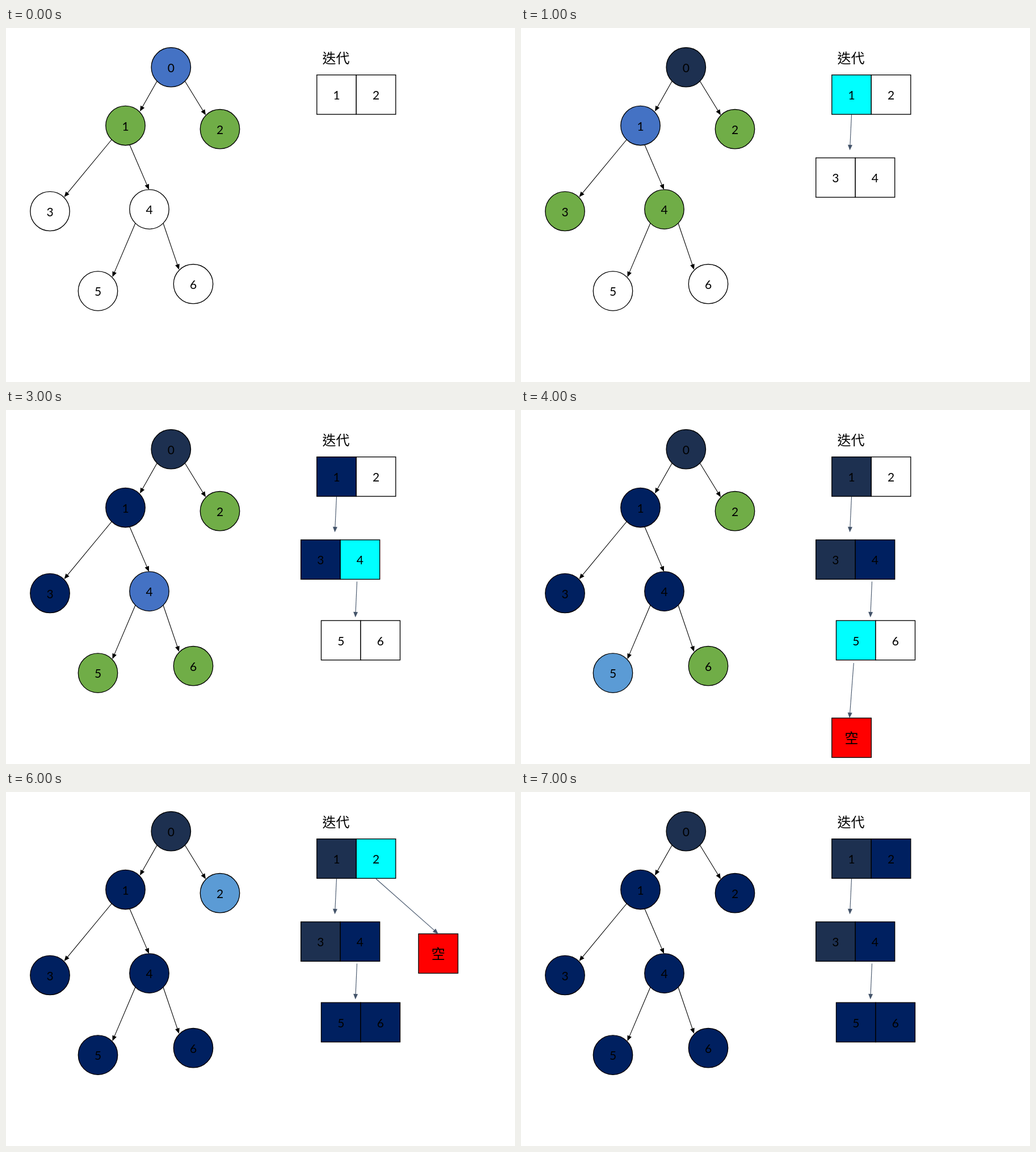
Animation, 897 px wide and 624 px high, one loop 8 s. Source, as an HTML page:

```html
<!DOCTYPE html>
<html lang="zh-Hant">
<head>
<meta charset="utf-8">
<title>Tree traversal</title>
<style>
  html, body { margin: 0; width: 100%; height: 100%; overflow: hidden; background: #fff; }
  svg { display: block; width: 897px; height: 624px; }
  circle, rect { stroke: #000; stroke-width: 1.35; }
  text { fill: #000; font: 21px Lato, "Open Sans", sans-serif; text-anchor: middle; }
  .han { font: 24px "Noto Sans CJK TC", "Noto Sans CJK SC", "Noto Sans CJK JP", "Noto Sans CJK", sans-serif; }
  .edge { color: #000; }
  .call { color: #44546a; }
  .edge, .call { fill: currentColor; stroke: none; }
  line { stroke: currentColor; stroke-width: 1.1; }
</style>
</head>
<body>
<svg id="stage" viewBox="0 0 897 624" xmlns="http://www.w3.org/2000/svg"></svg>
<script>
const stage = document.getElementById('stage');
const RADIUS = 34.7, CELL = 69.5;

const colors = {
  W: '#fff', G: '#70ad47', B: '#4472c4', L: '#5b9bd5',
  N: '#002060', D: '#1d3050', C: '#0ff', R: '#f00'
};

// One letter per second: a fill colour, "+" for shown, "-" for hidden.
const rules = [];
function timeline(letters) {
  const name = 'step' + rules.length;
  const frames = [...letters].map((letter, i) => {
    const fill = colors[letter] ? `fill:${colors[letter]};` : '';
    return `${i * 100 / letters.length}%{${fill}visibility:${letter === '-' ? 'hidden' : 'visible'}}`;
  });
  rules.push(`@keyframes ${name}{${frames.join('')}}`);
  return `style="animation:${name} ${letters.length}s step-end infinite"`;
}

function label(x, y, text) {
  const han = text > '9';
  return `<text x="${x}" y="${y + (han ? 9 : 8.6)}"${han ? ' class="han"' : ''}>${text}</text>`;
}

function node(text, x, y, letters) {
  return `<g ${timeline(letters)}><circle cx="${x}" cy="${y}" r="${RADIUS}"/>${label(x, y, text)}</g>`;
}

function cell(text, x, y, letters) {
  const half = CELL / 2;
  return `<g ${timeline(letters)}><rect x="${x}" y="${y}" width="${CELL}" height="${CELL}"/>`
    + label(x + half, y + half, text) + '</g>';
}

function arrow(kind, x1, y1, x2, y2, letters = '++++++++') {
  const length = Math.hypot(x2 - x1, y2 - y1);
  const angle = Math.atan2(y2 - y1, x2 - x1) * 180 / Math.PI;
  return `<g class="${kind}" ${timeline(letters)}>`
    + `<g transform="translate(${x2} ${y2}) rotate(${angle})">`
    + `<line x1="${-length}" x2="-8"/><path d="M0 0L-9.5 4V-4Z"/></g></g>`;
}

stage.innerHTML = [
  arrow('edge', 266, 94, 236, 147),
  arrow('edge', 315.5, 94, 352, 153.5),
  arrow('edge', 186, 197, 102.5, 298),
  arrow('edge', 218, 206, 252, 285),
  arrow('edge', 228, 344, 187.5, 439),
  arrow('edge', 277, 344, 305, 426),

  node('0', 290.8, 69.2, 'BDDDDDDD'),
  node('1', 210.5, 172, 'GBNNNNNN'),
  node('2', 377, 178.2, 'GGGGGGLN'),
  node('3', 77.5, 323, 'WGLNNNNN'),
  node('4', 252.5, 319.6, 'WGGBNNNN'),
  node('5', 162, 463.6, 'WWWGLNNN'),
  node('6', 330, 451.2, 'WWWGGLNN'),

  label(581.5, 53, '迭代'),
  cell('1', 547.8, 82.7, 'WCNNDDDD'),
  cell('2', 617.3, 82.7, 'WWWWWWCN'),
  cell('3', 519.7, 228.9, '-WCNDDDD'),
  cell('4', 589.2, 228.9, '-WWCNNNN'),
  cell('5', 555.5, 371.2, '---WCNNN'),
  cell('6', 625, 371.2, '---WWCNN'),
  cell('空', 516, 395, '--R-----'),
  cell('空', 547.8, 543, '----R---'),
  cell('空', 620, 543, '-----R--'),
  cell('空', 727, 250, '------R-'),

  arrow('call', 582.5, 153, 579.5, 215.5, '-+++++++'),
  arrow('call', 554.3, 299, 547, 395, '--+-----'),
  arrow('call', 618.5, 302.5, 615.7, 365.5, '---+++++'),
  arrow('call', 586.3, 446, 579, 543, '----+---'),
  arrow('call', 658.3, 446, 651, 543, '-----+--'),
  arrow('call', 652, 153, 761.7, 250, '------+-')
].join('');

const sheet = document.createElement('style');
sheet.textContent = rules.join('\n');
document.head.append(sheet);
</script>
</body>
</html>
```
